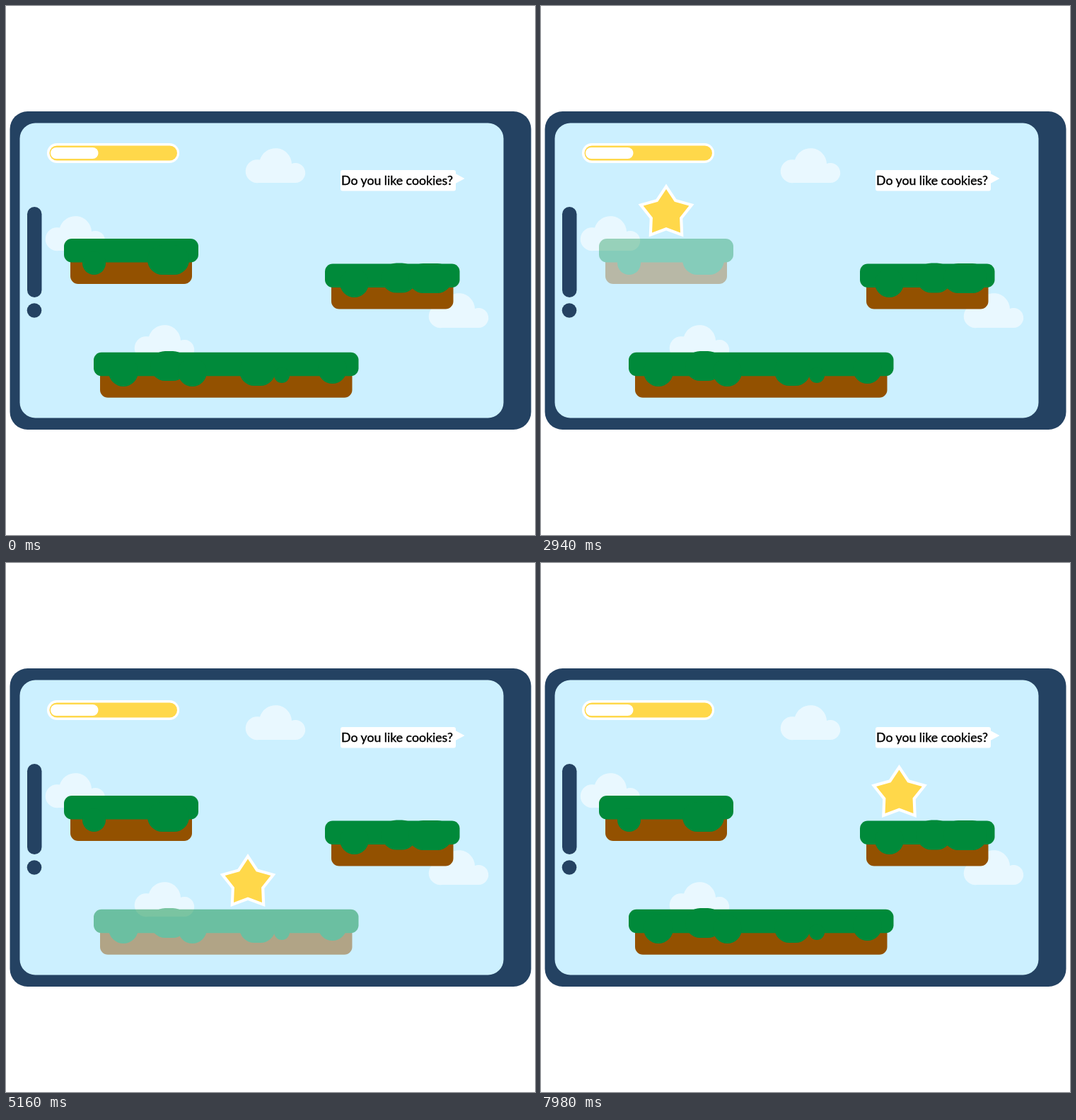
An HTML page for the animation above (8000 ms loop, 748 px wide and 748 px high).

```html
<!DOCTYPE html>
<html lang="en">
<head>
<meta charset="utf-8">
<title>Platform game</title>
<style>
  html, body { margin: 0; width: 100%; height: 100%; overflow: hidden; background: #fff; }
  svg { display: block; width: 100%; height: 100%; }
  .grass { fill: #008a3a; }
  .soil { fill: #935100; }
  text { font: 17.7px Lato, "Open Sans", sans-serif; text-anchor: middle; stroke: #000; stroke-width: .4; }
</style>
</head>
<body>
<svg viewBox="0 0 748 748">
  <defs>
    <path id="cloud" fill="#fff" fill-opacity=".58"
      d="M16.5 49A16.5 16.5 0 1 1 18 16.6A23 23 0 0 1 63 22A14 14 0 1 1 68 49Z"/>
  </defs>

  <rect x="5.5" y="149" width="737" height="450" rx="25" fill="#244262"/>
  <rect x="19.5" y="165.5" width="684" height="417" rx="22" fill="#ccf0ff"/>
  <rect x="30" y="284" width="20.5" height="128" rx="10.25" fill="#244262"/>
  <circle cx="40" cy="430.5" r="10.3" fill="#244262"/>

  <use href="#cloud" x="341" y="201"/>
  <use href="#cloud" x="58" y="297"/>
  <use href="#cloud" x="184" y="451"/>
  <use href="#cloud" x="600" y="406"/>

  <rect x="58" y="194" width="187" height="28" rx="14" fill="#fff"/>
  <rect x="61.5" y="197.5" width="180.5" height="21" rx="10.5" fill="#ffd84a"/>
  <rect x="63" y="200" width="67.5" height="16" rx="8" fill="#fff"/>

  <rect x="473" y="232" width="163" height="29.5" rx="3" fill="#fff"/>
  <path d="M635.5 237L648.5 244L635.5 251Z" fill="#fff"/>
  <text x="553" y="252.5">Do you like cookies?</text>

  <g id="platforms"></g>
  <g id="star"></g>
  <path id="jumpDown" fill="none" d="M177 293C211 268 315 300 342 452.5"/>
  <path id="jumpUp" fill="none" d="M342 452.5C393 372 460 273 507 327"/>
</svg>
<script>
const LOOP = 8000;
const $ = id => document.getElementById(id);

const rect = (cls, x, y, right, bottom, r) =>
  `<rect class="${cls}" x="${x}" y="${y}" width="${right - x}" height="${bottom - y}" rx="${r}"/>`;

// Each drip is a pill hanging out of the grass: [left, right, bottom].
function drip([left, right, bottom]) {
  const height = Math.min(right - left, 42);
  return rect("grass", left, bottom - height, right, bottom, height / 2);
}

function platform(x, y, right, drips) {
  const group = document.createElementNS("http://www.w3.org/2000/svg", "g");
  group.innerHTML = rect("soil", x + 9, y + 12, right - 9, y + 64, 11) +
    rect("grass", x, y, right, y + 33.5, 11) + drips.map(drip).join("");
  return $("platforms").appendChild(group);
}

const leftPlatform = platform(82, 329, 272, [[108, 141, 380], [200, 259, 380]]);
const bottomPlatform = platform(124, 489.7, 498.5, [[145, 187, 538], [204, 257, 530],
  [243, 284, 538], [330, 381, 537], [379, 401, 533], [441, 482, 534]]);
platform(451, 364.5, 641.5, [[472, 513, 412], [531, 581, 405.5], [569, 631, 406]]);

function starShape(radius, fill) {
  const points = Array.from({ length: 10 }, (_, i) => {
    const r = i % 2 ? radius * 0.59 : radius, a = i * Math.PI / 5;
    return `${r * Math.sin(a)},${-r * Math.cos(a)}`;
  });
  return `<polygon points="${points.join(" ")}" fill="${fill}"/>`;
}
const star = $("star");
star.innerHTML = starShape(41.5, "#fff") + starShape(34, "#ffd84a");

function ease(t, start, duration) {
  const p = Math.min(1, Math.max(0, (t - start) / duration));
  return p * p * (3 - 2 * p);
}

// Fades out and back in, `count` times, each fade lasting `half` ms.
function blink(t, start, half, count) {
  const phase = t - start;
  if (phase < 0 || phase > 2 * half * count) return 1;
  return ease(Math.abs(phase % (2 * half) - half), 0, half);
}

function along(path, progress) {
  return path.getPointAtLength(path.getTotalLength() * progress);
}

function draw(t) {
  leftPlatform.setAttribute("opacity", blink(t, 615, 685, 2));
  bottomPlatform.setAttribute("opacity", blink(t, 4458, 1356, 1));
  const { x, y } = t < 6000
    ? along($("jumpDown"), ease(t, 3375, 1043))
    : along($("jumpUp"), ease(t, 7189, 820));
  star.setAttribute("transform", `translate(${x} ${y})`);
  star.setAttribute("opacity", ease(t, 160, 360));
}

function tick() {
  draw(performance.now() % LOOP);
  requestAnimationFrame(tick);
}
tick();
</script>
</body>
</html>
```
